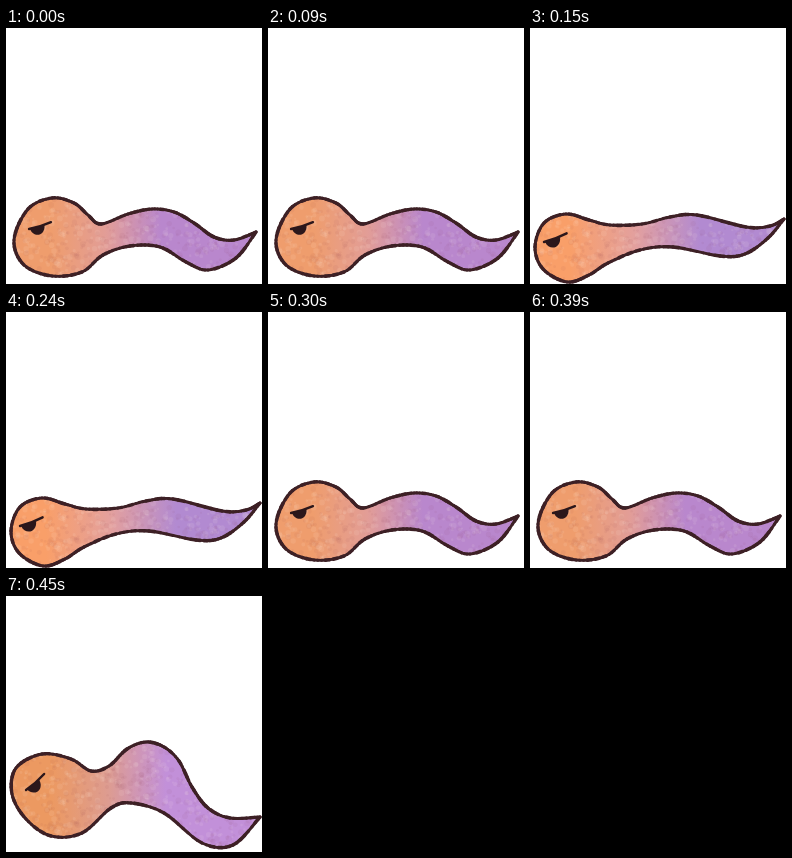
Write an HTML page with a canvas that moves like this. It is 256 px wide and 256 px high and loops after 600 ms.

```html
<!DOCTYPE html>
<html lang="en">
<head>
<meta charset="utf-8">
<title>Wriggling tadpole</title>
<style>
html, body { margin: 0; width: 100%; height: 100%; overflow: hidden; background: #fff; }
canvas { display: block; width: 256px; height: 256px; }
</style>
</head>
<body>
<canvas id="stage" width="256" height="256"></canvas>
<script>
const ctx = document.getElementById('stage').getContext('2d');
const STEP = 150;

// Body outlines run from the tail tip along the back, round the head, and home.
const poses = {
  mid: {
    body: [250,204, 228,212, 208,209, 188,195, 168,184, 146,181, 122,186, 95,196,
           82,187, 68,175, 46,170, 22,181, 8,212, 18,237, 46,248, 76,244,
           97,227, 124,218, 154,219, 180,234, 202,242, 230,230],
    eye: [23, 201, -0.24, 1],
    fade: [45, 155],
    colors: ['#ef9d6d', '#e29d97', '#b987cd']
  },
  flat: {
    body: [254,191, 240,198, 216,199, 167,187, 140,189, 112,196, 80,197, 59,192,
           36,186, 14,195, 5,219, 13,241, 37,254, 59,247, 78,235, 110,222,
           143,219, 190,228, 215,226, 238,210],
    eye: [14, 214, -0.3, 1.05],
    fade: [40, 170],
    colors: ['#f99f69', '#e3a09e', '#b28ad1']
  },
  arch: {
    body: [254,221, 224,222, 202,212, 186,191, 173,165, 158,151, 140,146, 121,153,
           103,170, 85,175, 65,163, 36,158, 10,172, 6,198, 20,223, 45,240,
           76,237, 105,212, 125,207, 158,217, 196,247, 227,249],
    eye: [20, 194, -0.66, 1.05],
    fade: [45, 160],
    colors: ['#ec9961', '#dd9c91', '#c290d9']
  }
};
const cycle = ['mid', 'flat', 'mid', 'arch'];

function random(seed) {
  return () => (seed = (seed * 16807) % 2147483647) / 2147483647;
}

// Smooth curve through the points, with a sharp corner at the tail tip.
function sample(flat) {
  const pts = [];
  for (let i = 0; i < flat.length; i += 2) pts.push([flat[i], flat[i + 1]]);
  pts.push(pts[0]);
  const out = [], last = pts.length - 1, n = 8;
  for (let i = 0; i < last; i++) {
    const a = pts[Math.max(i - 1, 0)], b = pts[i];
    const c = pts[i + 1], d = pts[Math.min(i + 2, last)];
    for (let k = 0; k < n; k++) {
      const t = k / n;
      out.push([0, 1].map(j => b[j] + 0.5 * t * (c[j] - a[j] +
        t * (2 * a[j] - 5 * b[j] + 4 * c[j] - d[j] +
        t * (3 * (b[j] - c[j]) + d[j] - a[j])))));
    }
  }
  out.push(pts[last]);
  return out;
}

function drawBody(g, { body, fade, colors }, rnd) {
  const line = sample(body);
  const shape = new Path2D();
  line.forEach(([x, y]) => shape.lineTo(x, y));
  shape.closePath();

  const paint = g.createLinearGradient(fade[0], 0, fade[1], 0);
  colors.forEach((c, i) => paint.addColorStop(i / 2, c));
  g.fillStyle = paint;
  g.fill(shape);

  // Soft paper grain
  g.save();
  g.clip(shape);
  for (let i = 0; i < 1100; i++) {
    g.fillStyle = i % 2 ? 'rgba(255,235,225,.09)' : 'rgba(110,40,70,.05)';
    g.beginPath();
    g.arc(rnd() * 256, 144 + rnd() * 112, 1 + rnd() * 2, 0, 7);
    g.fill();
  }
  g.restore();

  // Uneven ink line
  g.lineCap = 'round';
  g.strokeStyle = '#3d2025';
  for (let i = 1; i < line.length; i++) {
    g.lineWidth = 2.8 + rnd() * 0.9;
    g.beginPath();
    g.moveTo(...line[i - 1]);
    g.lineTo(...line[i]);
    g.stroke();
  }
}

function drawEye(g, [x, y, angle, size]) {
  g.save();
  g.translate(x, y);
  g.rotate(angle);
  g.scale(size, size);
  g.fillStyle = g.strokeStyle = '#2b171b';
  g.lineWidth = 2.3;
  g.beginPath();
  g.moveTo(0, 0);
  g.quadraticCurveTo(12, 0.5, 23, -1.5);
  g.stroke();
  g.beginPath();
  g.moveTo(1, 0);
  g.bezierCurveTo(2, 10, 14, 11, 16, 0);
  g.fill();
  g.restore();
}

function render(pose) {
  const sheet = document.createElement('canvas');
  sheet.width = sheet.height = 256;
  const g = sheet.getContext('2d');
  drawBody(g, pose, random(4217));
  drawEye(g, pose.eye);
  return sheet;
}

const sheets = {};
for (const name in poses) sheets[name] = render(poses[name]);

const start = performance.now();
function draw(now) {
  const step = Math.floor(Math.max(0, now - start) / STEP) % cycle.length;
  ctx.fillStyle = '#fff';
  ctx.fillRect(0, 0, 256, 256);
  ctx.drawImage(sheets[cycle[step]], 0, 0);
  requestAnimationFrame(draw);
}
draw(start);
</script>
</body>
</html>
```
